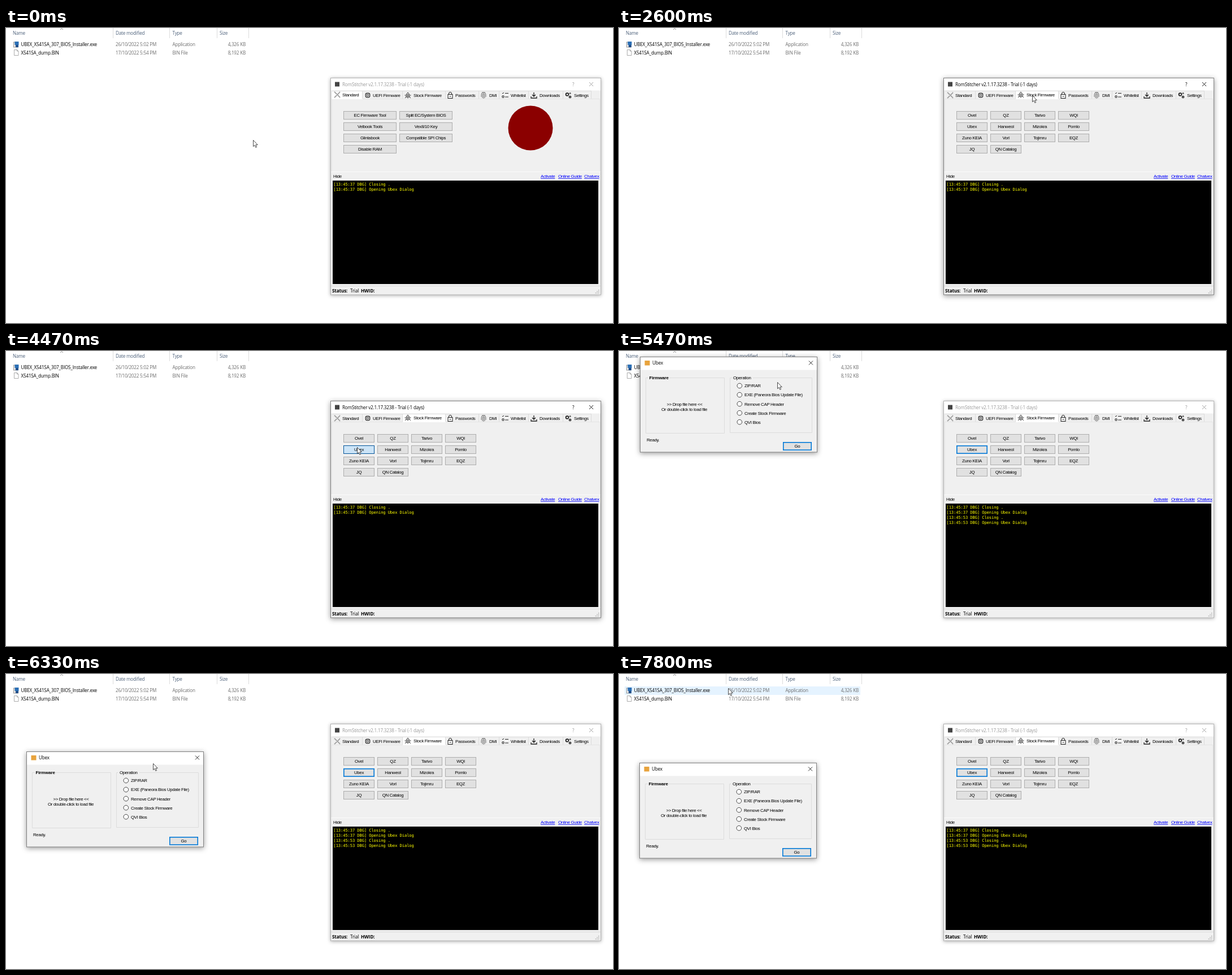
These frames come from a looping animation (1074x522 px, 8 s). An HTML page:

```html
<!DOCTYPE html>
<html lang="en">
<head>
<meta charset="utf-8">
<title>Firmware tool</title>
<style>
html, body { margin: 0; width: 100%; height: 100%; overflow: hidden; background: #fff; }
svg { display: block; width: 1074px; height: 522px; }
text { white-space: pre; }
.ui { font: 8.1px "Open Sans", "Noto Sans", sans-serif; letter-spacing: -.18px; }
.form { font: 7.9px "Liberation Sans", Arial, sans-serif; letter-spacing: -.35px; }
.log { font: 7.2px "DejaVu Sans Mono", monospace; letter-spacing: -.145px; fill: #ff0; }
.bold { font-weight: 700; letter-spacing: -.1px; }
.mid { text-anchor: middle; }
.end { text-anchor: end; }
.head { fill: #4c607a; }
.dim { fill: #6d6d6d; }
.link { fill: #00f; text-decoration: underline; }
.line { fill: none; stroke: #dcdcdc; }
.ico { fill: none; stroke: #222; }
.btn rect { fill: #e1e1e1; stroke: #adadad; }
.btn .ring { fill: none; stroke: none; }
.btn.focus rect { stroke: #0078d7; }
.btn.focus .ring { stroke: #0078d7; stroke-width: .6; }
.btn.hover rect { fill: #e5f1fb; stroke: #0078d7; }
.btn.down rect { fill: #cce4f7; stroke: #005499; }
.btn.hover .ring, .btn.down .ring { fill: none; stroke: none; }
.tab .face { fill: none; }
.tab.hover .face { fill: #d8eaf9; }
.tab.on .face { fill: #fff; }
.tab.on .lbl { transform: translateY(-1px); }
.radio circle { fill: #fff; stroke: #333; }
.radio.hover circle { stroke: #0078d7; }
#frame { fill: #f0f0f0; stroke: #b4b4b4; filter: drop-shadow(0 1px 3px #0005); }
#caption { fill: #999; stroke: #999; }
#main.active #frame { stroke: #808080; filter: drop-shadow(0 2px 5px #0006); }
#main.active #caption { fill: #000; stroke: #000; }
#caption text { stroke: none; }
#dialog > rect:first-child { filter: drop-shadow(0 2px 5px #0006); }
</style>
</head>
<body>
<svg id="stage" viewBox="0 0 1074 522" xmlns="http://www.w3.org/2000/svg"></svg>
<script>
const text = (x, y, s, cls) => `<text x="${x}" y="${y}" class="${cls}">${s.replace(/</g, '&lt;')}</text>`;
const rect = (x, y, w, h, more = '') => `<rect x="${x}" y="${y}" width="${w}" height="${h}" ${more}/>`;
const path = (d, more = 'class="ico"') => `<path d="${d}" ${more}/>`;
const at = (x, y, s) => `<g transform="translate(${x} ${y})">${s}</g>`;

const targets = [];
function button(x, y, w, label, cls = '', group = '') {
  if (group) targets.push({ x, y, w, label, group });
  const id = group ? `id="${group}-${label.replace(/\W/g, '')}"` : '';
  return `<g class="btn ${cls}" ${id}>` + rect(x + .5, y + .5, w - 1, 14) +
    rect(x + 1.3, y + 1.3, w - 2.6, 12.4, 'class="ring"') +
    text(x + w / 2, y + 10.2, label, 'form mid') + '</g>';
}
const grid = (cols, w, step, group) => cols.map((col, c) => col.map((s, r) =>
  button(Math.round(597 + c * step), Math.round(146.6 + r * 20.2), w, s, '', group)).join('')).join('');

// Tab icons, each centred on 0,0
const icons = {
  tools: path('M-5-5L5 5M5-5L-5 5', 'fill="none" stroke="#999" stroke-width="1.8"') + path('M-5-4L4 5M4-5L-5 4', 'fill="none" stroke="#e4e4e4" stroke-width=".7"'),
  chip: rect(-3.7, -3.7, 7.4, 7.4, 'rx="2.2" class="ico" stroke-width="1.2"') + rect(-1.5, -1.5, 3, 3, 'class="ico" stroke-width=".8"'),
  stock: path('M-3-1L0-5L3-1V3H-3ZM-5.5 0H-4M4 0H5.5M-5 5L-3 3M5 5L3 3M0 3V5.5', 'class="ico" stroke-width=".9"') + rect(-1.2, -1.2, 2.4, 2.4, 'class="ico" stroke-width=".8"'),
  lock: rect(-4, -1.5, 8, 7, 'class="ico"') + path('M-2.5-1.5V-3A2.5 2.5 0 0 1 2.5-3V-1.5M0 1V3'),
  print: path('M-4 3V-1A4 4 0 0 1 4-1V3M-2 5V-1A2 2 0 0 1 2-1V5M0-2V6M-3-5H3', 'fill="none" stroke="#777"'),
  list: path('M-5-4L-4-3L-2-5M-5 1H-2V4H-5ZM0-3.5H6M0 3H6'),
  down: path('M0-5V2M-3-1L0 2L3-1M-5 2V5H5V2', 'class="ico" stroke-width="1.3"'),
  gears: '<circle cx="-2" cy="-1.5" r="2.4" class="ico" stroke-width="1.8"/><circle cx="3" cy="3" r="1.6" class="ico" stroke-width="1.5"/><circle cx="3.2" cy="-3.4" r="1" class="ico"/>'
};
const tabs = [
  ['Standard', 577, 586, 595, 'tools'], ['UEFI Firmware', 631, 640, 649, 'chip'],
  ['Stock Firmware', 702, 711, 721, 'stock'], ['Passwords', 778, 786, 795, 'lock'],
  ['DMI', 837, 845, 855, 'print'], ['Whitelist', 873, 883, 893, 'list'],
  ['Downloads', 925, 934, 944, 'down'], ['Settings', 986, 995, 1005, 'gears']
];
const tabStrip = tabs.map(([name, x, ix, tx, icon], i) => {
  const w = (tabs[i + 1] ? tabs[i + 1][1] : 1036) - x;
  return `<g class="tab" id="tab${i}">` + rect(x, 111, w, 15, 'class="face"') +
    path(`M${x + w - .5} 112V125M${x} 111.5H${x + w}`, 'class="line"') +
    '<g class="lbl">' + at(ix, 119, icons[icon]) + text(tx, 122, name, 'form') + '</g></g>';
}).join('');

const files = [
  ['UBEX_X541SA_307_BIOS_Installer.exe', '26/10/2022 5:02 PM', 'Application', '4,326 KB'],
  ['X541SA_dump.BIN', '17/10/2022 5:54 PM', 'BIN File', '8,192 KB']
];
const explorer = rect(10, 22, 417, 15, 'id="row" fill="#e5f3ff"') +
  path('M189.5 0V18M289.5 0V18M373.5 0V18M429.5 0V18', 'class="line"') +
  path('M96 3L98.5 .8L101 3', 'fill="none" stroke="#777" stroke-width=".8"') +
  [['Name', 12], ['Date modified', 194], ['Type', 294.5], ['Size', 378]].map(([s, x]) => text(x, 12, s, 'ui head')).join('') +
  files.map(([name, date, type, size], i) => {
    const y = 32 + i * 14.6;
    return text(26.5, y, name, 'ui') + text(194, y, date, 'ui dim') + text(294.5, y, type, 'ui dim') + text(424, y, size, 'ui dim end');
  }).join('') +
  rect(13.5, 25, 8, 9, 'fill="#e8e8e8" stroke="#777" stroke-width=".7"') + rect(15.5, 24, 7, 6, 'fill="#2a6fb5"') +
  rect(17, 30, 5, 4, 'fill="#24508a"') +
  path('M14.5 38.5H19.5L22 41V48.5H14.5ZM19.5 38.5V41H22', 'fill="#fff" stroke="#999" stroke-width=".8"');

const standard = [
  ['EC Firmware Tool', 'Velbook Tools', 'Glintabook', 'Disable RAM'],
  ['Split EC/System BIOS', 'Vex8/10 Key', 'Compatible SPI Chips']
];
const vendors = [
  ['Ovel', 'Ubex', 'Zuno KEIA', 'JQ'], ['QZ', 'Hanweol', 'Vorl', 'QN Catalog'],
  ['Tarivo', 'Mizokra', 'Tojimru'], ['WQI', 'Pomlo', 'EQZ']
];
const logLines = ['37 DBG] Closing .', '37 DBG] Opening Ubex Dialog', '53 DBG] Closing .', '53 DBG] Opening Ubex Dialog'];
let grip = '';
for (let i = 0; i < 3; i++) for (let j = 0; j <= i; j++) grip += rect(1048 - j * 2.6, 463 + i * 2.6, 1.4, 1.4, 'fill="#aaa"');

const mainWindow = '<g id="main">' + rect(574.5, 88.5, 478, 383.5, 'id="frame"') +
  rect(575, 89, 477, 21.5, 'fill="#fff"') + rect(582, 95.5, 8, 8, 'fill="#444"') +
  '<g id="caption">' + text(595, 102.7, 'RomStitcher v2.1.17.3238 - Trial (-1 days)', 'ui') +
  text(1002, 103, '?', 'ui') + path('M1032 96L1039 103M1039 96L1032 103', 'stroke-width=".9"') + '</g>' +
  path('M576.5 254.5V125.5H1050.5V254.5', 'class="line" opacity=".6"') + path('M575 254.5H1052', 'stroke="#fafafa"') + tabStrip +
  '<g id="page0">' + grid(standard, 94, 99.3, 'std') + '<circle cx="928" cy="177" r="39.5" fill="#8b0000"/></g>' +
  '<g id="page2">' + grid(vendors, 55, 60, 'ven') + '</g>' +
  text(579, 265, 'Hide', 'form') + text(946, 265, 'Activate', 'form link') +
  text(977, 265, 'Online Guide', 'form link') + text(1023, 265, 'Chatvex', 'form link') +
  rect(578, 270, 470, 183, 'fill="#000"') +
  logLines.map((s, i) => `<g class="${i > 1 ? 'fresh' : ''}">` + text(579.5, 278.6 + i * 9.05, '[13:45:' + s, 'log') + '</g>').join('') +
  path('M575 456.5H1052', 'stroke="#dadada"') + text(577, 467.6, 'Status:', 'ui bold') +
  text(609, 467.6, 'Trial', 'ui') + text(628, 467.6, 'HWID:', 'ui bold') + grip + '</g>';

const ops = ['ZIP/RAR', 'EXE (Paneora Bios Update File)', 'Remove CAP Header', 'Create Stock Firmware', 'QVI Bios'];
const dialog = '<g id="dialog">' + rect(.5, .5, 313, 168.5, 'fill="#f0f0f0" stroke="#808080"') +
  rect(1, 1, 312, 22.5, 'fill="#fff"') + rect(8.5, 7, 9, 8.5, 'fill="#e8a33d"') + text(22, 14.3, 'Ubex', 'ui') +
  path('M299 7.5L306 14.5M306 7.5L299 14.5', 'stroke="#111" stroke-width=".9"') +
  path('M15 37.5H10.5V135.5H149.5V37.5H52M163 37.5H159.5V134.5H304.5V37.5H200', 'class="line"') +
  text(16.5, 39.6, 'Firmware', 'form bold') + text(165, 39.8, 'Operation', 'form') +
  text(79, 87, '>> Drop file here <<', 'form mid') + text(78.5, 96, 'Or double-click to load file', 'form mid') +
  ops.map((s, i) => `<g class="radio" id="op${i}"><circle cx="176.3" cy="${51.5 + i * 16.05}" r="4.3" stroke-width=".9"/>` +
    text(185, 54.4 + i * 16.05, s, 'form') + '</g>').join('') +
  text(12, 150, 'Ready.', 'form') + button(253, 151, 51, 'Go', 'focus') + '</g>';

const pointer = '<g id="pointer">' + path('M.5 .5V11.7L3 9.4L4.8 13.4L6.6 12.6L4.9 8.7H8.3Z', 'fill="#fff" stroke="#111" stroke-width=".75"') + '</g>';
document.getElementById('stage').innerHTML = explorer + mainWindow + dialog + pointer;

const $ = id => document.getElementById(id);
const flag = (el, cls, on) => el.classList.toggle(cls, on);
const show = (el, on) => el.setAttribute('visibility', on ? 'visible' : 'hidden');
const inOut = p => p * p * (3 - 2 * p), out = p => p * (2 - p), into = p => p * p, flat = p => p;

// tick, x, y, easing of the stretch leading there
const route = [
  [0, 437, 198], [7, 437, 198], [20, 743, 114, inOut], [38, 743, 114], [39, 731, 119], [46, 621, 173, out],
  [49, 621, 173], [50, 621, 172], [61, 621, 172], [62, 621, 169.5], [76, 621, 169.5], [79, 470, 125, into],
  [82, 280, 55], [86, 261, 31, out], [87, 261, 31], [91, 260, 71, into], [98, 260, 178, out], [101, 260, 178],
  [102, 249, 156], [110, 213, 26, out], [111, 213, 26], [117, 193, 25, inOut], [120, 193, 25]
];
function pointAt(n) {
  const i = Math.max(1, route.findIndex(k => k[0] >= n));
  const [n0, x0, y0] = route[i - 1], [n1, x1, y1, ease = flat] = route[i];
  const p = ease((n - n0) / (n1 - n0));
  return [Math.round(x0 + (x1 - x0) * p), Math.round(y0 + (y1 - y0) * p)];
}
const inside = ([px, py], x, y, w, h) => px >= x && px < x + w && py >= y && py < y + h;

const LOOP = 8000, TICK = 200 / 3, DIALOG = 70;
const vendorButtons = targets.filter(b => b.group === 'ven')
  .map(b => ({ ...b, el: $('ven-' + b.label.replace(/\W/g, '')) }));
const fresh = document.querySelectorAll('.fresh');

function draw(now) {
  const n = Math.floor((now % LOOP + 4) / TICK) % 120;
  const pos = pointAt(n), stock = n >= 22;
  $('pointer').setAttribute('transform', `translate(${pos})`);

  flag($('main'), 'active', n >= 21 && n < 69);
  flag($('tab0'), 'on', !stock);
  flag($('tab2'), 'on', stock);
  flag($('tab2'), 'hover', !stock && inside(pos, 702, 111, 75, 15));
  show($('page0'), !stock);
  show($('page2'), stock);
  for (const b of vendorButtons) {
    const main = b.label === 'Ubex';
    flag(b.el, 'hover', stock && inside(pos, b.x, b.y, b.w, 15));
    flag(b.el, 'down', main && n >= 67 && n < 69);
    flag(b.el, 'focus', main && n >= 69);
  }
  fresh.forEach(el => show(el, n >= 69));

  // The dialog hangs on the pointer while its title bar is dragged
  const [gx, gy] = pointAt(Math.min(98, Math.max(87, n)));
  const dx = gx - 224, dy = gy - 21;
  $('dialog').setAttribute('transform', `translate(${dx} ${dy})`);
  $('dialog').setAttribute('opacity', Math.min(1, Math.max(0, (n - DIALOG + 1) / 3)));
  ops.forEach((s, i) => flag($('op' + i), 'hover',
    n > DIALOG && inside(pos, dx + 171, dy + 46 + i * 16, 20 + s.length * 3.5, 12)));
  show($('row'), n > 100 && inside(pos, 10, 22, 417, 15));
}
function loop() {
  draw(performance.now());
  requestAnimationFrame(loop);
}
loop();
</script>
</body>
</html>
```
